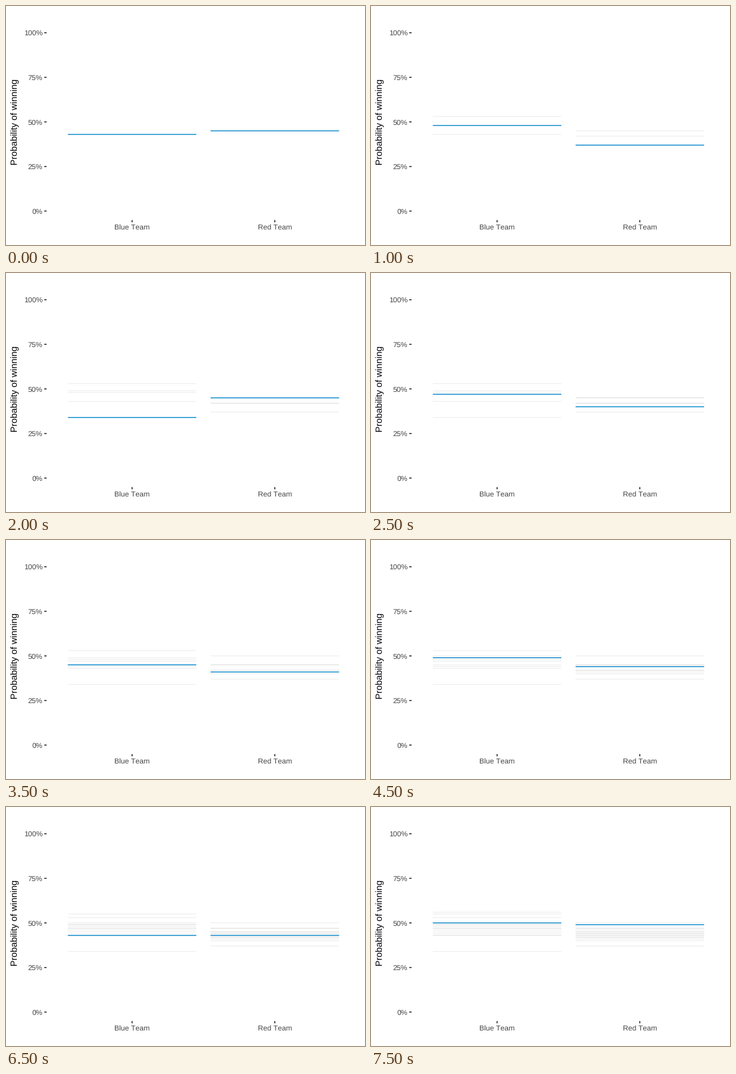
Write a matplotlib script that moves like this. It is 600 px wide and 400 px high and loops after 8 s.

```python
import matplotlib.pyplot as plt
from matplotlib.animation import FuncAnimation

plt.rcParams.update({
    "font.family": "Liberation Sans",
    "text.hinting": "none",
    "text.kerning_factor": 6,
})

W, H, DPI = 600, 400, 100
PX = 72 / DPI  # points per pixel
BLUE, TRAIL = "#0a8acc", (0.5, 0.5, 0.5, 0.11)
INK, GREY = "#111111", "#474747"

# Winning probability (%) per draw
TEAMS = {
    "Blue Team": [43, 53, 48, 49, 34, 47, 44, 45, 50, 49, 47, 46, 55, 43, 56, 50],
    "Red Team": [45, 42, 37, 42, 45, 40, 50, 41, 44, 44, 47, 47, 43, 43, 46, 49],
}
DRAWS = 16
FIRST, STEP = 210.7, 238.6
HALF = 0.45 * STEP


def y_of(pct):
    return 194 + (50 - pct) * 2.985


fig = plt.figure(figsize=(W / DPI, H / DPI), dpi=DPI, facecolor="white")
ax = fig.add_axes([0, 0, 1, 1])
ax.set(xlim=(0, W), ylim=(H, 0))
ax.axis("off")


def segment(x, y, color, width=1.5):
    return ax.plot(x, y, color=color, lw=width * PX, solid_capstyle="butt",
                   snap=False)[0]


def label(x, y, text, size, color, **kw):
    ax.text(x, y, text, fontsize=size * PX, color=color, va="baseline", **kw)


for pct in range(0, 101, 25):
    y = y_of(pct)
    segment([64, 67.8], [y, y], INK)
    label(61, y + 4.4, f"{pct}%", 12.2, GREY, ha="right")

label(18.9, 194.3, "Probability of winning", 15.3, "black", ha="center",
      rotation=90, rotation_mode="anchor")

bars = []
for i, (name, values) in enumerate(TEAMS.items()):
    x = FIRST + i * STEP
    segment([x, x], [358.3, 362], INK)
    label(x, 374.2, name, 12.2, GREY, ha="center")
    for k, pct in enumerate(values):
        y = y_of(pct)
        bars.append((k, segment([x - HALF, x + HALF], [y, y], BLUE)))


def update(now):
    for k, bar in bars:
        bar.set_visible(k <= now)
        bar.set_color(BLUE if k == now else TRAIL)
        bar.set_zorder(3 if k == now else 2)
    return [bar for _, bar in bars]


anim = FuncAnimation(fig, update, frames=DRAWS, init_func=lambda: update(0),
                     interval=500, repeat=True, repeat_delay=0, blit=False)
plt.show()
```
